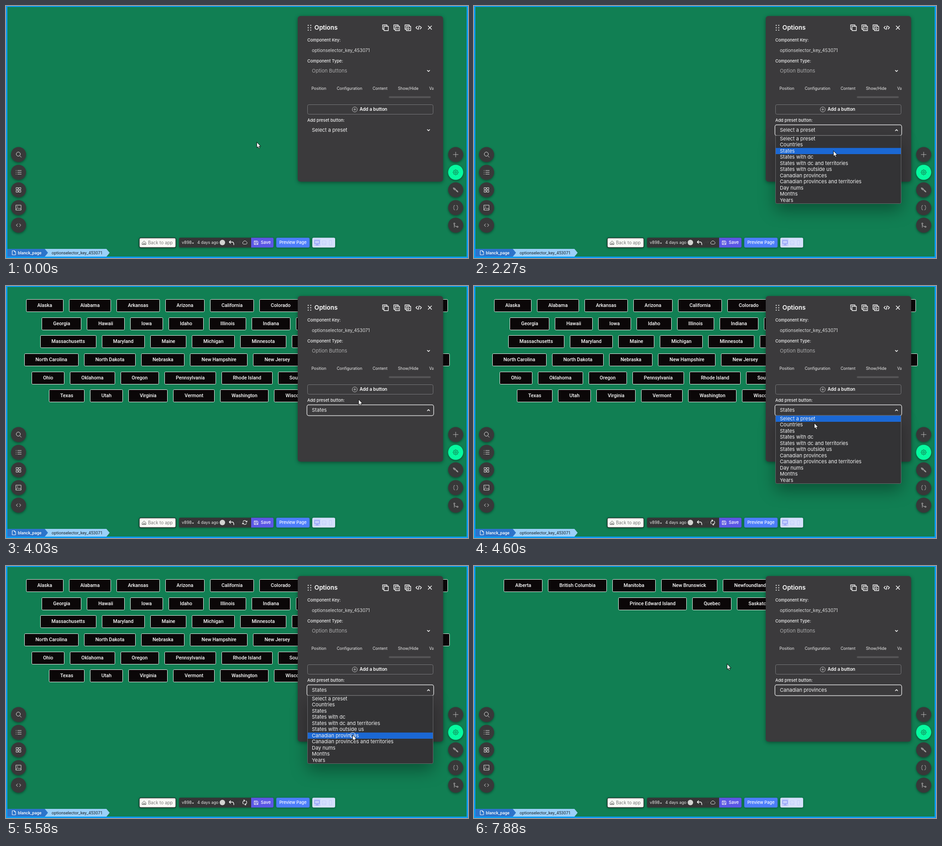
An HTML page with a canvas for the animation above (8 s loop, 1012 by 553 pixels).

```html
<!DOCTYPE html>
<html lang="en">
<head>
<meta charset="utf-8">
<title>Preset buttons</title>
<style>
  html, body { margin: 0; width: 100%; height: 100%; overflow: hidden; background: #117f53; }
  canvas { display: block; }
</style>
</head>
<body>
<canvas id="stage" width="1012" height="553"></canvas>
<script>
const ctx = document.getElementById('stage').getContext('2d');
const LOOP = 8000;
const UI = 'Inter, sans-serif', BODY = 'Roboto, sans-serif';
const WHITE = '#f4f4f4', DARK = '#3b3a3c';

const BURSTS = [[0, 0, 1], [500, 1420, 8], [1670, 1670, 1], [1970, 2270, 3], [2690, 3730, 8],
  [3880, 4890, 8], [5010, 6020, 8], [6170, 7010, 7], [7730, 7880, 2]];

// Pointer path: time, x, y.
const POINTER = [[0, 549, 299], [430, 549, 299], [960, 690, 248], [1160, 762, 240], [1420, 800, 271],
  [1670, 800, 271], [1970, 796, 288], [2120, 789, 312], [2270, 787, 318], [3730, 787, 318],
  [4020, 772, 250], [4170, 760, 223], [4310, 742, 270], [4460, 741, 272], [4600, 745, 301],
  [4890, 750, 330], [5440, 759, 371], [6020, 759, 372], [6310, 600, 300], [6600, 306, 190],
  [6740, 330, 116], [7010, 469, 154], [7730, 520, 190], [7880, 554, 215], [8000, 554, 215]];
const CLICKS = [1420, 2690, 4310, 5580];

const PRESETS = ['Select a preset', 'Countries', 'States', 'States with dc', 'States with dc and territories',
  'States with outside us', 'Canadian provinces', 'Canadian provinces and territories', 'Day nums', 'Months', 'Years'];
const rows = text => text.split('/').map(row => row.split(','));
const STATES = rows('Alaska,Alabama,Arkansas,Arizona,California,Colorado,Connecticut,Delaware,Florida/' +
  'Georgia,Hawaii,Iowa,Idaho,Illinois,Indiana,Kansas,Kentucky,Louisiana/' +
  'Massachusetts,Maryland,Maine,Michigan,Minnesota,Missouri,Mississippi,Montana/' +
  'North Carolina,North Dakota,Nebraska,New Hampshire,New Jersey,New Mexico,Nevada,New York/' +
  'Ohio,Oklahoma,Oregon,Pennsylvania,Rhode Island,South Carolina,South Dakota,Tennessee/' +
  'Texas,Utah,Virginia,Vermont,Washington,Wisconsin,West Virginia,Wyoming');
const PROVINCES = rows('Alberta,British Columbia,Manitoba,New Brunswick,Newfoundland and Labrador,Nova Scotia,Ontario/' +
  'Prince Edward Island,Quebec,Saskatchewan');

function refreshTime(t) {
  const [first, last, count] = BURSTS.filter(b => b[0] <= t).pop();
  if (count === 1) return first;
  const step = (last - first) / (count - 1);
  return first + step * Math.min(count - 1, Math.floor((t - first) / step + 0.08));
}

function pointerAt(t) {
  const i = Math.max(1, POINTER.findIndex(p => p[0] >= t));
  const [t0, x0, y0] = POINTER[i - 1], [t1, x1, y1] = POINTER[i];
  const k = (t - t0) / (t1 - t0);
  return { x: Math.round(x0 + (x1 - x0) * k), y: Math.round(y0 + (y1 - y0) * k) };
}

function text(str, x, y, size, color = WHITE, weight = 400, family = UI, align = 'left') {
  ctx.font = `${weight} ${size}px ${family}`;
  ctx.textAlign = align;
  ctx.textBaseline = 'middle';
  ctx.fillStyle = color;
  ctx.fillText(str, x, y);
}

function box(x, y, w, h, r, fill, stroke, lineWidth = 1) {
  ctx.beginPath();
  ctx.roundRect(x, y, w, h, r);
  paint(fill, stroke, lineWidth);
}

function disc(x, y, r, fill, stroke, lineWidth = 1) {
  ctx.beginPath();
  ctx.arc(x, y, r, 0, 7);
  paint(fill, stroke, lineWidth);
}

function paint(fill, stroke, lineWidth) {
  if (fill) { ctx.fillStyle = fill; ctx.fill(); }
  if (stroke) { ctx.strokeStyle = stroke; ctx.lineWidth = lineWidth; ctx.stroke(); }
}

function icon(d, x, y, color = WHITE, lineWidth = 1, fill, angle = 0) {
  ctx.save();
  ctx.translate(x, y);
  ctx.rotate(angle);
  ctx.lineCap = ctx.lineJoin = 'round';
  const shape = new Path2D(d);
  if (fill) { ctx.fillStyle = fill; ctx.fill(shape); }
  ctx.strokeStyle = color;
  ctx.lineWidth = lineWidth;
  if (color !== 'none') ctx.stroke(shape);
  ctx.restore();
}

function withShadow(color, blur, dy, draw) {
  ctx.save();
  ctx.shadowColor = color;
  ctx.shadowBlur = blur;
  ctx.shadowOffsetY = dy;
  draw();
  ctx.restore();
}

function optionButtons(list) {
  const pad = 24.85, gap = 12;
  ctx.font = `500 10.7px ${BODY}`;
  const layout = list.map(row => row.map(name => ctx.measureText(name).width + 2 * pad));
  list.forEach((row, r) => {
    const widths = layout[r], y = Math.floor(29.3 + r * 39.7) + 0.5;
    let x = 506 - (widths.reduce((a, b) => a + b) + gap * (row.length - 1)) / 2;
    row.forEach((name, i) => {
      const left = Math.round(x) + 0.5, right = Math.round(x + widths[i]) - 0.5;
      box(left, y, right - left, 27, 2, '#0b0708', '#e8efe9');
      text(name, x + widths[i] / 2, y + 13.5, 10.7, '#fff', 500, BODY, 'center');
      x += widths[i] + gap;
    });
  });
}

const ROUND_Y = [326, 365, 403.5, 442.5, 481];
const LEFT_ICONS = ['M3 3L6 6M4-1A4.5 4.5 0 1 1-5-1A4.5 4.5 0 1 1 4-1',
  'M-2-4H6M-2 0H6M-2 4H6M-5.5-4H-5M-5.5 0H-5M-5.5 4H-5',
  'M-5-5H-1V-1H-5ZM1-5H5V-1H1ZM-5 1H-1V5H-5ZM1 1H5V5H1Z',
  'M-5.5-5.5H5.5V5.5H-5.5ZM-5.5 4L-2 0L1 3L3 1L5.5 4M-2.5-3V-2',
  'M-2-3L-5 0L-2 3M2-3L5 0L2 3'];
const RIGHT_ICONS = ['M-5.5 0H5.5M0-5.5V5.5', '',
  'M-5-4.5L-1.5-3.5L0-1L-1 0.5L-4-1ZM1 0L4.5 2.5L5 5L1.5 3Z',
  'M-2-5Q-4-5-4-3V-1L-5 0L-4 1V3Q-4 5-2 5M2-5Q4-5 4-3V-1L5 0L4 1V3Q4 5 2 5',
  'M-3-2V5M-3 0Q-2 3 3 3M-1.5-3.5A1.5 1.5 0 1 1-4.5-3.5A1.5 1.5 0 1 1-1.5-3.5M5.5 3.5A1.5 1.5 0 1 1 2.5 3.5A1.5 1.5 0 1 1 5.5 3.5'];

function gear(x, y) {
  ctx.beginPath();
  for (let i = 0; i <= 64; i++) {
    const a = i / 64 * Math.PI * 2, r = 5 + 0.8 * Math.tanh(3 * Math.cos(8 * a));
    ctx.lineTo(x + r * Math.cos(a), y + r * Math.sin(a));
  }
  paint(null, '#17603f', 1);
  disc(x, y, 2, null, '#17603f');
}

function roundButtons() {
  ROUND_Y.forEach((y, i) => {
    withShadow('rgba(0,0,0,.4)', 5, 2, () => {
      disc(27.5, y, 16.5, '#383839');
      disc(985, y, 16.5, i === 1 ? '#06faa0' : '#383839');
    });
    icon(LEFT_ICONS[i], 27.5, y, '#e2e2e2');
    if (i === 1) gear(985, y);
    else icon(RIGHT_ICONS[i], 985, y, '#c4c4c4', 0.9, i === 2 ? '#777' : null);
  });
}

function breadcrumb() {
  icon('M0 0H217L224 8.5L217 17H0Z', 3, 533, 'none', 1, '#9bd0f8');
  icon('M0 0H82L89 8.5L82 17H0Z', 3, 533, 'none', 1, '#2d74ca');
  icon('M-3.5-4.5H1L3.5-2V4.5H-3.5ZM1-4.5V-2H3.5', 17.5, 541.5, '#fff');
  text('blanck_page', 26, 542, 9.2, '#fff', 500, BODY);
  text('optionselector_key_453071', 100, 542, 9.2, '#17222c', 400, BODY);
}

function toolbar(t) {
  withShadow('rgba(0,0,0,.35)', 4, 1, () => {
    box(292, 509, 80, 21, 3, '#fbfbf8', '#111');
    box(379, 508.5, 207, 21.5, 3, '#353536');
    box(592, 508.5, 73, 21.5, 3, '#4d7efb');
    box(671, 508.5, 50, 21.5, 3, '#d6e0fd');
  });
  icon('M-4 0L0-4L4 0V4H-4ZM-1.5 4V1H1.5V4', 302.5, 519.5, '#555');
  text('Back to app', 311, 520, 9.7, '#777');
  text('v898', 385, 519.5, 9, '#e4e4e4');
  icon('M-2-1H2L0 1.5Z', 409.5, 520.5, 'none', 1, '#eee');
  text('4 days ago', 419, 519.5, 8.9, '#e4e4e4');
  disc(474, 519, 6, '#d4d4d2');
  icon('M-2-4L-5-1L-2 2M-5-1H2Q5-1 5 5', 494, 519, '#fff', 1.4);
  icon('M2-4L5-1L2 2M5-1H-2Q-5-1-5 5', 509, 519, '#414142');
  if (t >= 2860 && t < 7010) {
    icon('M-4.2-1A4.3 4.3 0 0 1 3.7-2.2M4.2-4.7V-2H1.5M4.2 1A4.3 4.3 0 0 1-3.7 2.2M-4.2 4.7V2H-1.5',
      523, 519, '#f4f4f4', 1.15, null, Math.PI * (t - 2940) / 1000);
  } else {
    icon('M-3 4A2.7 2.7 0 0 1-3-1A3.5 3.5 0 0 1 3.5-1A2.6 2.6 0 0 1 3 4Z', 523, 518.5, '#ddd');
  }
  box(537, 508.5, 49, 21.5, [0, 3, 3, 0], '#5c57e5');
  icon('M-4-4H2.5L4-2.5V4H-4ZM-2.5-4V-1.5H1.5V-4M-2.5 4V1H2.5V4', 548, 519.5, '#eee');
  text('Save', 558, 519.5, 9.4, '#fff', 500);
  text('Preview Page', 628.5, 519.5, 9.2, '#fff', 500, UI, 'center');
  box(674, 511, 15, 16, 2, '#c4cffc');
  icon('M-5-5H5V2H-5ZM0 2V5M-3 5H3', 681.5, 519.5, '#7f8cf5');
  icon('M-4-4H4V4H-4ZM-4 3L-1 0L1 2L2 1L4 3', 697, 519.5, '#c3cef9');
  icon('M-2.5-5H2.5V5H-2.5Z', 711, 519.5, '#c3cef9');
}

const CHEVRON = 'M-2.5-1.2L0 1.3L2.5-1.2';

function panel(value, focused) {
  withShadow('rgba(0,0,0,.4)', 9, 2, () => box(639, 22, 318.5, 363.5, 6, DARK));
  for (let i = 0; i < 6; i++) disc(662 + 5.5 * (i % 2), 42.5 + 5.2 * (i >> 1), 1.2, '#ddd');
  text('Options', 675.5, 48, 13.5, '#fff', 600);
  [831, 855.5, 880].forEach((x, i) => {
    icon('M-3-3H6.5V6.5H-3ZM-3.5 3.5H-6V-6H3.5V-3.5', x, 47.5, '#fff', 1.3);
    if (i === 1) icon('M0 0V4M3.5 0V4', x, 47.5, '#fff', 1.2);
    if (i === 2) icon('M0 0H2L3.5 2L2 4H0Z', x, 47.5, '#fff', 1.2);
  });
  icon('M-3-3L-6 0L-3 3M3-3L6 0L3 3M1-4L-1 4', 904, 47.5, '#fff', 1.5);
  icon('M-3.7-3.7L3.7 3.7M3.7-3.7L-3.7 3.7', 928.5, 47.5, '#fff', 1.4);

  text('Component Key:', 660, 75.5, 9.2, WHITE, 500);
  text('optionselector_key_453071', 670, 97.5, 10, '#dedede');
  text('Component Type:', 660, 121, 9.2, WHITE, 500);
  text('Option Buttons', 670, 142.5, 11, '#a9a9aa');
  icon(CHEVRON, 925.5, 142.5, '#fff', 1.5);

  ctx.save();
  ctx.beginPath();
  ctx.rect(660, 170, 276.5, 24);
  ctx.clip();
  [['Position', 669], ['Configuration', 724.5], ['Content', 803], ['Show/Hide', 858.5], ['Validation', 927]]
    .forEach(([name, x]) => text(name, x, 181.8, 8.7, '#ededed'));
  ctx.restore();
  box(838.5, 198, 92, 4, 2, '#555456');

  box(660.5, 216.5, 275, 21, 3, null, '#77777a');
  disc(764, 227, 5.5, null, '#ccc', 0.9);
  icon('M-2.5 0H2.5M0-2.5V2.5', 764, 227, '#ccc', 0.9);
  text('Add a button', 774.5, 227.5, 9.8, '#fff', 600);
  text('Add preset button:', 660, 251.5, 9.2, WHITE, 500);
  if (focused) box(659.25, 260.75, 277.5, 23.75, 4, null, '#d5d5d6', 1.5);
  text(value, 670, 273, 11);
  icon(CHEVRON, 925.5, 272.5, '#fff', 1.5, null, focused ? Math.PI : 0);
}

function menu(hovered) {
  const top = 284.5, pitch = 13.5;
  withShadow('rgba(0,0,0,.35)', 36, 15, () => box(660.5, top, 275, 149, [0, 0, 3, 3], '#333335'));
  box(660.5, top, 275, 149, [0, 0, 3, 3], null, '#67676a');
  PRESETS.forEach((name, i) => {
    if (i === hovered) {
      ctx.fillStyle = '#1b68d4';
      ctx.fillRect(661, top + i * pitch, 274, pitch);
    }
    text(name, 670, top + (i + 0.5) * pitch + 0.3, 11);
  });
}

function pointer({ x, y }, clicked) {
  if (clicked) disc(x + 0.5, y + 0.5, 6, null, '#f2f2f2');
  icon('M0 0V12L2.7 9.6L4.6 13.8L6.6 12.9L4.8 8.9H8.5Z', x + 0.3, y, '#111', 1, '#fff');
}

function draw(now) {
  const t = refreshTime(now % LOOP);
  const open = (t >= 1670 && t < 2830) || (t >= 4450 && t < 5720);
  const choice = t < 2830 ? 0 : t < 5850 ? 2 : 6;

  ctx.fillStyle = '#117f53';
  ctx.fillRect(0, 0, 1012, 553);
  if (choice) optionButtons(choice === 2 ? STATES : PROVINCES);
  ctx.strokeStyle = '#0c9cf5';
  ctx.lineWidth = 4;
  ctx.strokeRect(1, 0, 1010, 552);
  breadcrumb();
  panel(PRESETS[choice], t >= 1670);
  roundButtons();
  toolbar(t);
  if (open) {
    // The highlight trails the pointer slightly.
    const hoverY = pointerAt(Math.max(0, t - 80)).y;
    menu(Math.max(0, Math.floor((hoverY - 284.5) / 13.5)));
  }
  pointer(pointerAt(t), CLICKS.some(c => Math.abs(c - t) < 20));
  requestAnimationFrame(draw);
}
requestAnimationFrame(draw);
</script>
</body>
</html>
```
